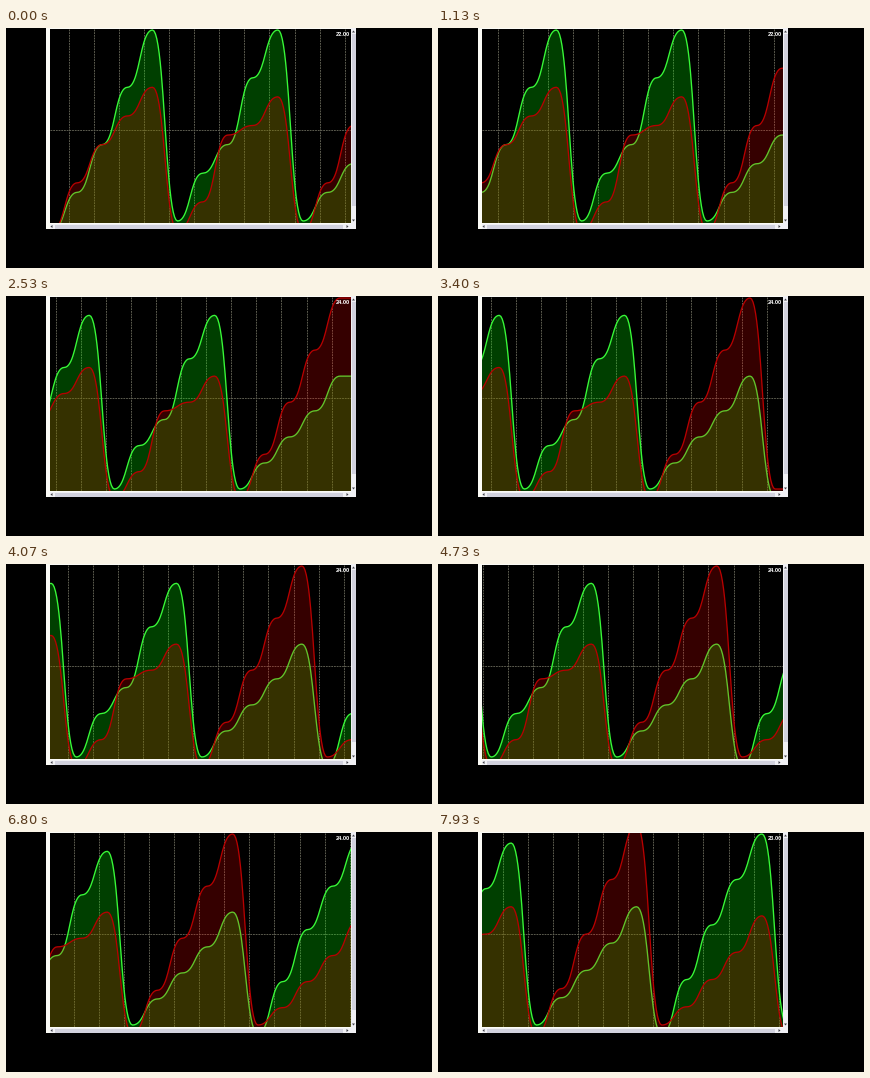
Write a matplotlib script that moves like this. It is 426 by 240 pixels and loops after 8 s.

```python
import numpy as np
import matplotlib.pyplot as plt
from matplotlib.animation import FuncAnimation
from matplotlib.collections import LineCollection
from matplotlib.patches import Polygon, Rectangle

W, H, DPI = 426, 240, 64
PT = 72 / DPI                      # points per pixel
LOOP, STEP = 8000, 40
LEFT, RIGHT, TOP, BOTTOM = 44, 345, 1, 195
PITCH = 25.08                      # pixels per sample and per second
FIRST_X = 147 - 5 * PITCH          # first sample at time 0
ENTRY = 356                        # samples become known left of here
GRID_X, GRID_Y = 62.8, 101.5
LOW, Y_MAX, Y_LOW = 2, 2, 193

GREEN = np.array([22, 1, 5, 10, 16, 22, 2, 7, 10, 17, 22,
                  2, 5, 8, 11, 15, 1, 7, 13, 18, 23, 2])
RED = np.array([16, 1, 6, 10, 13, 16, 1, 4, 11, 12, 15,
                1, 6, 12, 18, 24, 2, 4, 7, 10, 14, 1])

fig = plt.figure(figsize=(W / DPI, H / DPI), dpi=DPI, facecolor="black")
ax = fig.add_axes([0, 0, 1, 1])
ax.set_xlim(0, W)
ax.set_ylim(H, 0)
ax.axis("off")


def box(x0, y0, x1, y1, color, z):
    patch = Rectangle((x0, y0), x1 - x0, y1 - y0, fc=color, ec="none", zorder=z)
    return ax.add_patch(patch)


def arrow(points):
    ax.add_patch(Polygon(points, fc="#404048", ec="none", zorder=3))


# Window frame and scroll bars
box(40, 0, 350, 201, "#fbfbf6", 0)
plot = box(LEFT, TOP, RIGHT, BOTTOM, "black", 1)
box(345, 0, 350, 201, "#f0f0f4", 2)
box(345.5, 6, 349.5, 178, "#d2d2de", 2)
box(44, 196, 345, 201, "#f0f0f4", 2)
box(49, 196.5, 337, 200.5, "#d2d2de", 2)
arrow([(346, 4.5), (349, 4.5), (347.5, 2.5)])
arrow([(346, 191.5), (349, 191.5), (347.5, 193.5)])
arrow([(340.5, 197), (340.5, 200), (342.5, 198.5)])
arrow([(46.5, 197), (46.5, 200), (44.5, 198.5)])

grid = LineCollection([], colors="#646456", linewidths=0.9 * PT,
                      linestyles=[(0, (2, 1))], zorder=1.1)
ax.add_collection(grid)


def make_series(line_color, fill_color, alpha, width, z):
    area = Polygon([(0, 0), (1, 0), (1, 1)], fc=fill_color, ec="none",
                   alpha=alpha, zorder=z)
    ax.add_patch(area)
    line, = ax.plot([], [], color=line_color, lw=width * PT, zorder=z + 0.1)
    for part in (area, line):
        part.set_clip_path(plot)
    return area, line


green = make_series("#38f838", "#00ff00", 0.25, 1.35, 1.2)
red = make_series("#b80000", "#ff0000", 0.21, 1.3, 1.4)
label = ax.text(344.3, 7.8, "", color="white", ha="right", va="baseline",
                family="Liberation Sans", weight="bold",
                size=5.6 * PT, zorder=1.8)

# Bezier step with horizontal tangents between neighbouring samples
U = np.linspace(0, 1, 24)
EASE_X = 1.5 * U - 1.5 * U**2 + U**3
EASE_Y = 3 * U**2 - 2 * U**3


def curve(values, x0, top):
    k = np.arange(len(values) - 1)[:, None]
    xs = (x0 + PITCH * (k + EASE_X)).ravel()
    vs = (values[:-1, None] + np.diff(values)[:, None] * EASE_Y).ravel()
    ys = Y_LOW - (vs - LOW) * (Y_LOW - Y_MAX) / (top - LOW)
    # the newest value is held up to the right edge
    return np.append(xs, max(xs[-1], RIGHT + 10)), np.append(ys, ys[-1])


def draw(i):
    shift = PITCH * (i + 0.5) * STEP / 1000
    x0 = FIRST_X - shift
    known = min(len(GREEN), int((ENTRY - x0) // PITCH) + 1)
    recent = slice(known - 6, known)
    top = max(GREEN[recent].max(), RED[recent].max())

    for values, (area, line) in ((GREEN, green), (RED, red)):
        xs, ys = curve(values[:known], x0, top)
        line.set_data(xs, ys)
        area.set_xy(np.column_stack([np.r_[xs[0], xs, xs[-1]],
                                     np.r_[H, ys, H]]))

    start = LEFT + (GRID_X - LEFT - shift) % PITCH
    cols = np.floor(np.arange(start, RIGHT, PITCH)) + 0.5
    grid.set_segments([[(x, TOP), (x, BOTTOM)] for x in cols]
                      + [[(LEFT, GRID_Y), (RIGHT, GRID_Y)]])
    label.set_text(f"{top:.2f}")
    return [grid, *green, *red, label]


anim = FuncAnimation(fig, draw, frames=LOOP // STEP, interval=STEP,
                     repeat=True, repeat_delay=0, blit=False)
plt.show()
```
